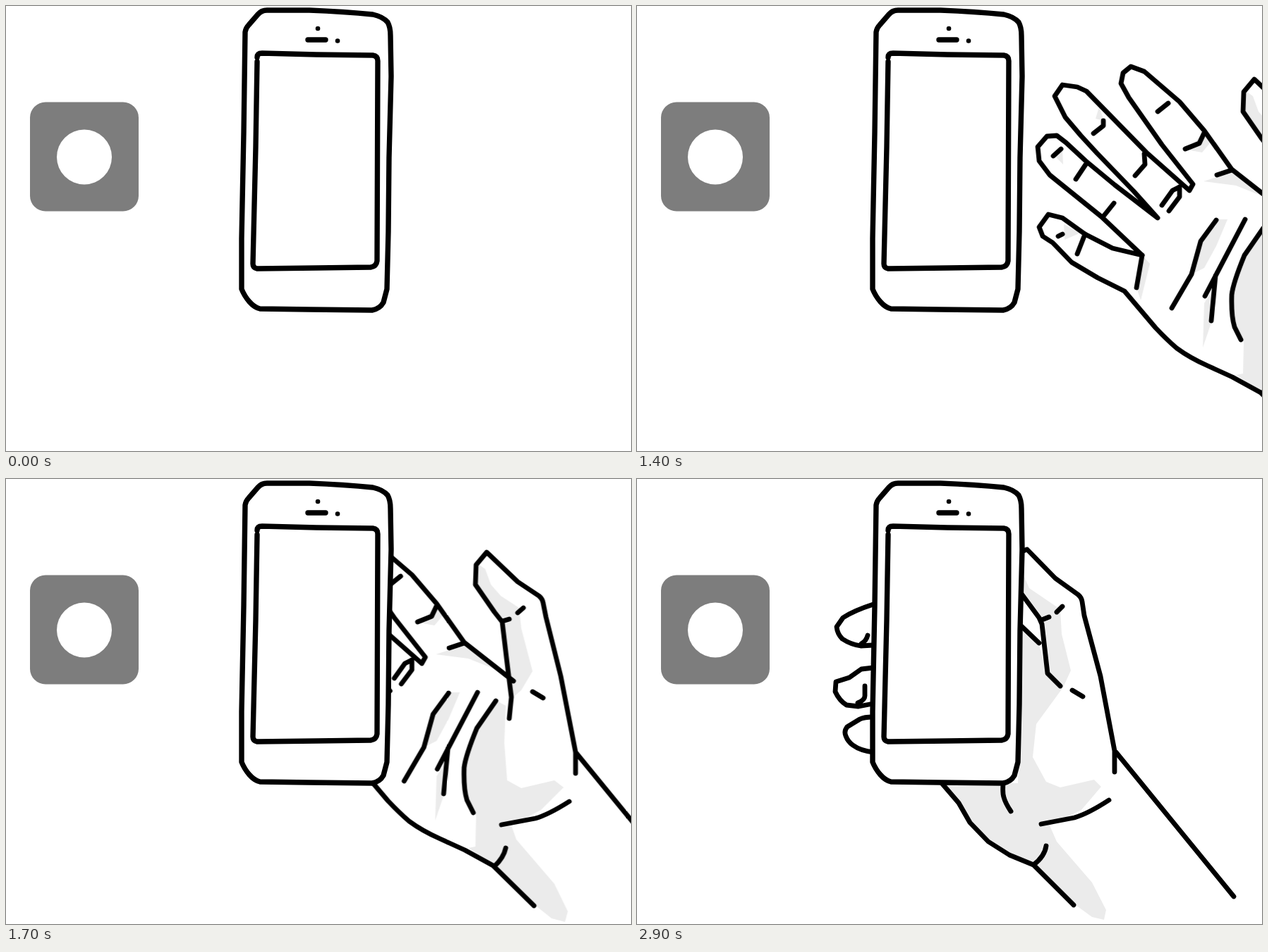
Recreate the animation shown at these times as an HTML page. Size 886 by 632 pixels, loop 3900 ms.

```html
<!DOCTYPE html>
<html lang="en">
<head>
<meta charset="utf-8">
<title>Hand reaching for a phone</title>
<style>
  html, body { margin: 0; width: 100%; height: 100%; overflow: hidden; background: #fff; }
  svg { display: block; width: 100%; height: 100%; }
  .ink { fill: none; stroke: #000; stroke-width: 6.8; stroke-linecap: round; stroke-linejoin: round; }
  .phone { stroke-width: 7.4; }
  .body { fill: #fff; }
  .shade { fill: #ebebeb; }
  .open, .grip { opacity: 0; animation: 3900ms infinite; }
  .open { animation-name: slide; }
  .grip { animation-name: grip; }

  /* Ten poses, 100 ms apart, then a pause behind the phone */
  @keyframes slide {
    0% { opacity: 0; transform: translateX(387.3px); animation-timing-function: step-end; }
    25.641% { opacity: 1; transform: translateX(387.3px); animation-timing-function: steps(9, end); }
    48.7179% { opacity: 1; transform: translateX(-193.7px); animation-timing-function: step-end; }
    74.3589%, 100% { opacity: 0; transform: translateX(-193.7px); animation-timing-function: step-end; }
  }
  @keyframes grip {
    0% { opacity: 0; animation-timing-function: step-end; }
    74.3589%, 100% { opacity: 1; animation-timing-function: step-end; }
  }
</style>
</head>
<body>
<svg viewBox="0 0 886 632" preserveAspectRatio="none">
  <rect x="34" y="136.5" width="154" height="155" rx="22" fill="#7d7d7d"/>
  <circle cx="111" cy="214.5" r="39" fill="#fff"/>

  <g class="open">
    <path class="shade" d="M733 120 L744 128 L752 150 L766 166 L792 183 L795 212 L811 273 L795 300 L780 313 L777 250 L768 203 L731 150Z
      M760 315 L773 322 L771 375 L775 428 L795 439 L842 428 L855 438 L823 470 L781 492 L788 512 L842 575 L861 614 L857 629
      L838 624 L813 604 L757 549 L720 524 L730 522 L731 478 L714 440 L714 408 L732 356Z
      M692 303 H708 L692 341 L675 372 L657 381 L670 334Z
      M673 485 L675 422 L689 400 L686 447Z
      M674 249 L714 236 L765 273 L720 255Z
      M650 204 L675 180 L687 190 L672 208Z
      M587 354 L598 366 L585 418 L579 400Z
      M476 310 L500 322 L477 332Z
      M463 213 L474 204 L475 225Z
      M526 143 L533 163 L521 160Z"/>
    <!-- fingers and lower palm -->
    <path class="ink" d="M784 287 L714 232 L675 177 L640 136 L590 93 L571 86 L560 95 L557 110 L568 130 L615 197 L659 253 L654 262
      L593 208 L508 121 L495 115 L474 112 L463 128 L478 158 L500 184 L523 209 L575 263 L609 301
      L548 254 L507 220 L479 194 L466 184 L452 185 L439 200 L441 220 L456 240 L529 299 L587 354
      L545 344 L506 324 L474 301 L454 296 L441 314 L446 327 L460 336 L487 364 L524 386 L562 405
      L606 457 Q622 474 636 486 Q655 500 680 511 L715 527 L755 549 L813 606"/>
    <!-- thumb and wrist -->
    <path class="ink" d="M778 340 L781 310 L775 262 L768 203 L757 189 L730 150 L731 122 L746 104 L790 146 L820 166 Q825 170 826 176 L830 196 L851 280 L872 388 V418 M872 388 L1042 596"/>
    <!-- creases -->
    <path class="ink" d="M768 202 L778 199 M790 190 L798 183 M811 302 L826 311
      M692 304 L670 334 L657 381 L629 429 M733 303 L676 412 M691 383 L685 447
      M759 315 L732 354 Q716 393 714 410 Q713 440 718 456 L727 474
      M767 491 L815 482 Q833 477 863 458 M773 524 Q770 538 757 550
      M609 150 L624 138 M648 203 L668 195 L675 180 M693 240 L714 233
      M518 181 L532 170 V163 M577 241 L591 225 L590 210
      M615 283 L630 262 L640 257 M625 291 L640 271 V257
      M461 213 L472 203 M493 246 L507 225 M531 300 L547 280
      M468 327 L474 324 M495 352 L506 324 M587 354 L579 400"/>
  </g>

  <g class="grip">
    <path class="shade" d="M545 130 L556 155 L600 185 L602 220 L615 272 L604 296 L582 276 L573 203 L545 163Z
      M545 208 L570 236 L582 278 L604 296 L566 348 L561 395 L580 430 L600 438 L648 427 L658 437 L630 470 L585 492 L595 515
      L645 573 L665 612 L662 626 L645 622 L619 603 L562 547 L528 533 L498 514 L472 487 L456 460 L432 432 H540Z
      M317 237 L327 222 L335 236Z M313 320 L323 308 V321Z"/>
    <path class="ink" d="M335 178 Q307 187 292 197 L283 210 Q284 220 291 227 Q303 235 317 237 L335 236 M318 234 Q325 230 327 222
      M335 268 L318 270 L301 282 L282 288 L281 302 Q287 315 297 321 L314 323 L335 319 M313 318 Q323 314 323 308 V294
      M335 338 Q322 338 316 341 L298 352 Q293 358 296 365 Q299 373 306 378 Q317 386 335 388"/>
    <path class="ink" d="M545 103 L553 100 L593 141 L625 164 Q630 168 631 174 L634 194 L657 280 L677 386 V416 M679 388 L846 593
      M545 163 L570 197 L574 206 L582 276 L600 294 M574 200 L584 196 M595 189 L603 181 M617 300 L632 309 M545 209 L570 233
      M432 432 L456 460 L472 488 L498 515 L528 534 L562 548 L619 605 M580 521 Q578 536 562 548
      M519 433 Q518 446 520 452 Q522 460 530 472 M573 490 L620 481 Q640 475 669 456"/>
  </g>

  <g class="ink phone">
    <path class="body" d="M339 37 Q340 31 344 27 L357 12 Q362 6 370 6 L430 6 Q480 8 520 12 Q534 15 541 23 Q545 30 545 42 L546 100 L543 215 L542 320 L540 402 L535 421 Q530 430 519 432
      L430 431 L360 430 Q352 428 345 420 Q338 412 334 402 L334 330 L337 180Z"/>
    <path d="M356 73 Q356 67 363 67 L440 69 L520 70 Q527 71 527 78 L526 362 Q525 370 517 371 L440 372 L356 373 Q350 372 350 366 L354 200 L356 79"/>
    <path d="M428 48 H453"/>
    <path stroke-width="6.5" d="M442 32 h.1 M470 49.5 h.1"/>
  </g>
</svg>
</body>
</html>
```
